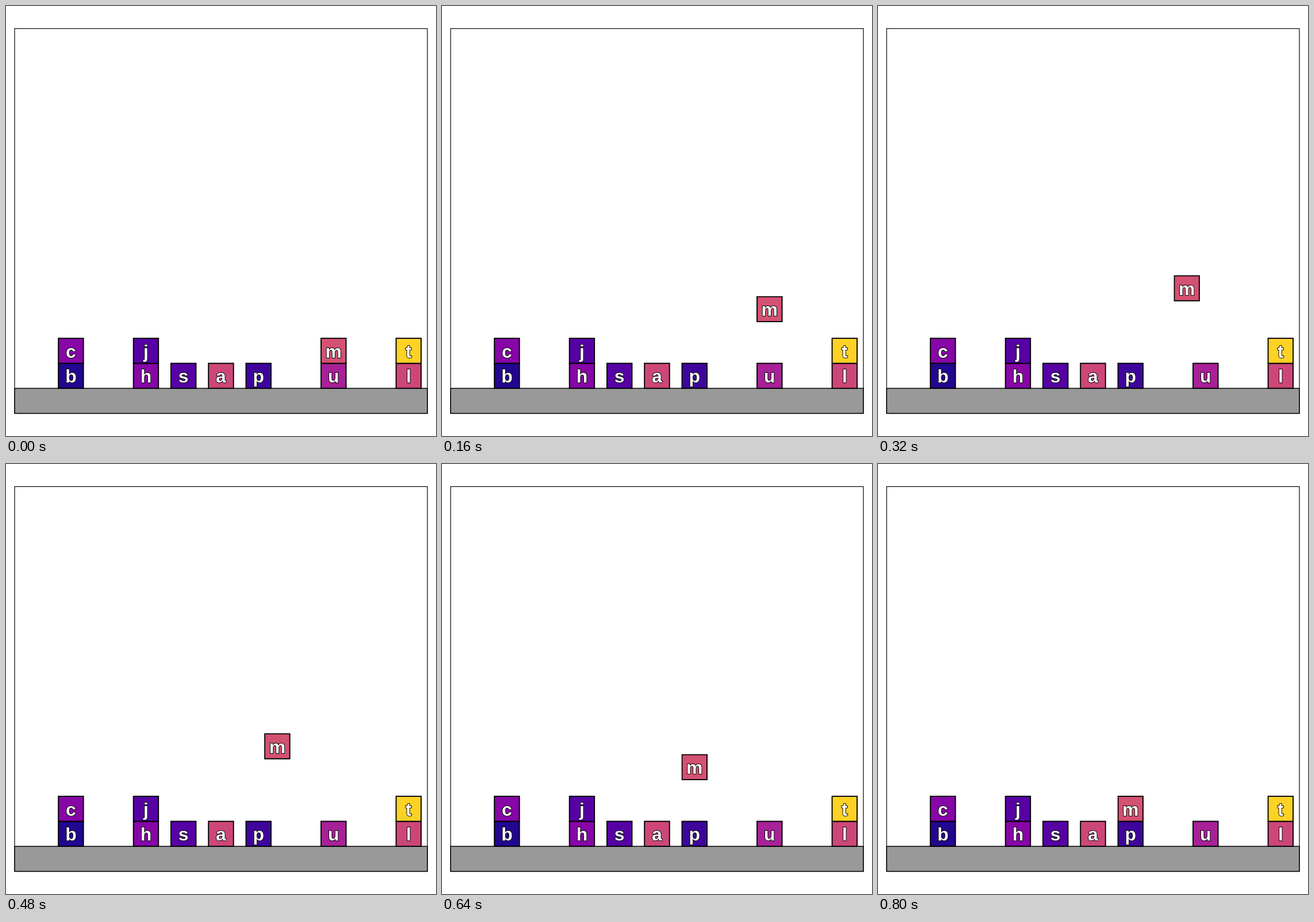
An HTML page that plays this animation: 748 px wide and 748 px high, repeating every 840 ms.

```html
<!DOCTYPE html>
<html lang="en">
<head>
<meta charset="utf-8">
<title>Blocks</title>
<style>
  html, body { margin: 0; width: 100%; height: 100%; overflow: hidden; background: #fff; }
  svg { display: block; width: 748px; height: 748px; }
  rect { stroke: #000; }
  .block rect { stroke-width: 1.9px; }
  text {
    font: bold 32px "Liberation Sans", Arial, sans-serif;
    text-anchor: middle;
    fill: #fff;
    stroke: #000;
    stroke-width: 1.9px;
    stroke-linejoin: round;
    paint-order: stroke;
  }
  /* lift 6 ticks, carry 8, lower 6, rest 1; a tick is 40 ms */
  #mover { animation: move 840ms infinite; }
  @keyframes move {
    0% { transform: translate(0, 0); animation-timing-function: steps(6, end); }
    28.57142% { transform: translate(0, -108.8px); animation-timing-function: steps(8, end); }
    66.66666% { transform: translate(-130.55px, -108.8px); animation-timing-function: steps(6, end); }
    95.23809%, 100% { transform: translate(-130.55px, 0); }
  }
</style>
</head>
<body>
<svg viewBox="0 0 748 748">
  <rect x="15" y="39.3" width="718" height="669.3" fill="none" stroke-width="1.2"/>
  <rect x="15" y="665.1" width="718" height="43.5" fill="#999" stroke-width="1.5"/>
  <g id="blocks"></g>
</svg>
<script>
  const NS = "http://www.w3.org/2000/svg";
  const LEFT = 15, FLOOR = 665.1, SLOT = 718 / 11, SIZE = SLOT * 2 / 3;

  // letter, slot, level, colour
  const blocks = [
    ["b", 1, 0, "#220690"], ["c", 1, 1, "#8606a6"],
    ["h", 3, 0, "#8606a6"], ["j", 3, 1, "#5601a4"],
    ["s", 4, 0, "#5601a4"], ["a", 5, 0, "#cc4778"],
    ["p", 6, 0, "#3f049c"], ["u", 8, 0, "#a72197"],
    ["l", 10, 0, "#cc4778"], ["t", 10, 1, "#fcd225"],
    ["m", 8, 1, "#d35171"]
  ];

  function add(parent, tag, attrs) {
    const el = document.createElementNS(NS, tag);
    for (const key in attrs) el.setAttribute(key, attrs[key]);
    return parent.appendChild(el);
  }

  const root = document.getElementById("blocks");
  for (const [letter, slot, level, fill] of blocks) {
    const x = LEFT + (slot + 0.5) * SLOT;
    const y = FLOOR - (level + 0.5) * SIZE;
    const g = add(root, "g", { class: "block" });
    if (letter === "m") g.id = "mover";
    add(g, "rect", { x: x - SIZE / 2, y: y - SIZE / 2, width: SIZE, height: SIZE, fill });
    add(g, "text", { x, y: y + 11.7 }).textContent = letter;
  }
</script>
</body>
</html>
```
